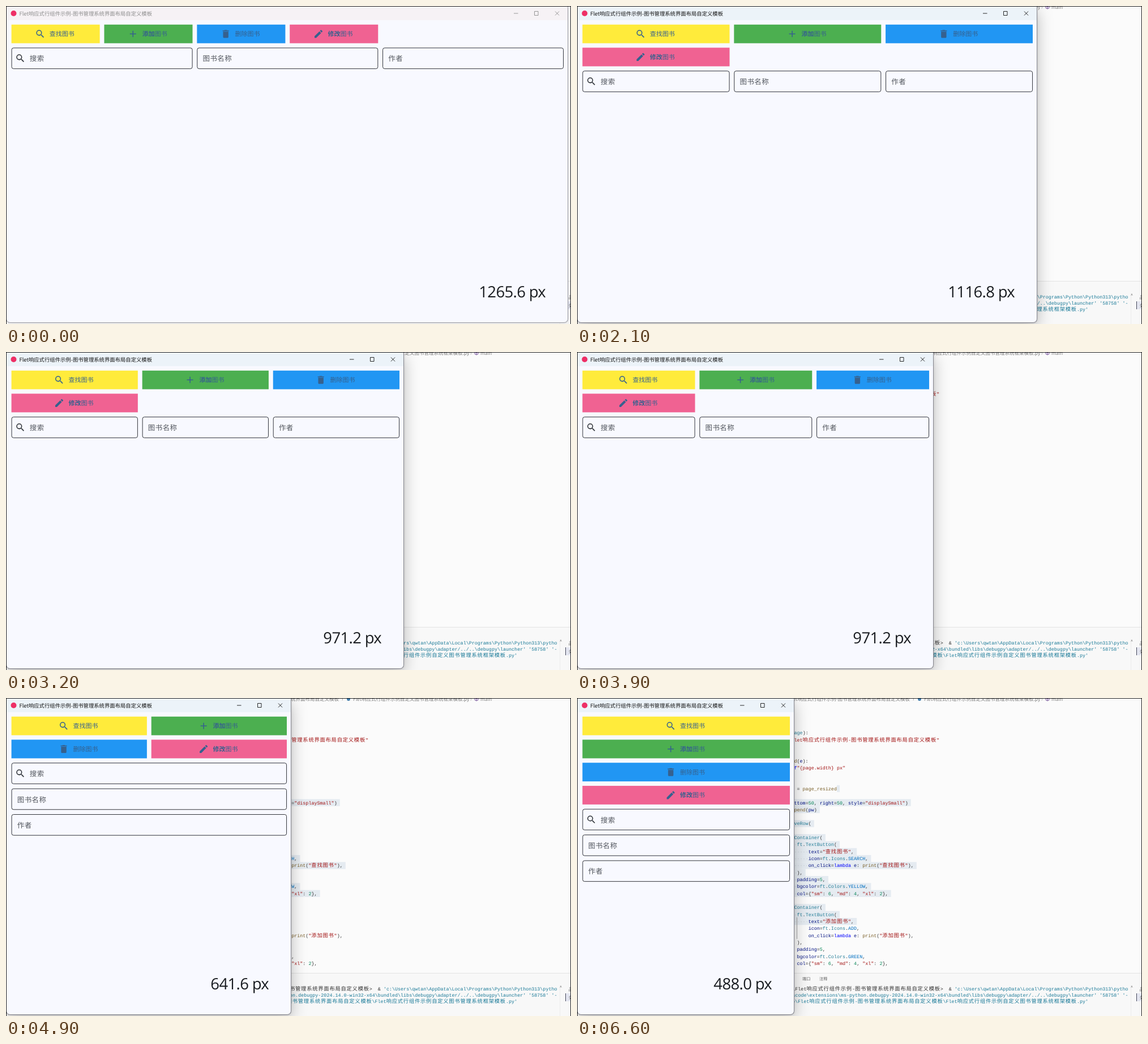
An HTML page for the animation above (8 s loop, 998 by 561 pixels).

```html
<!DOCTYPE html>
<html lang="zh">
<head>
<meta charset="utf-8">
<style>
html, body { margin: 0; width: 100%; height: 100%; overflow: hidden; }
#stage { position: relative; width: 998px; height: 561px; overflow: hidden; background: #fbfbfb; }
#stage > * { position: absolute; left: 0; top: 0; }
text { font-family: "Noto Sans CJK SC", "Noto Sans CJK", sans-serif; white-space: pre; text-rendering: geometricPrecision; }
.tab { font-size: 7.2px; fill: #5c5c5c; }
.crumb { font-size: 8.5px; fill: #777; }
.mono { font: 8.38px "Liberation Mono", monospace; fill: #333; }
.mono .han { font: 9.3px "Noto Sans CJK SC", "Noto Sans CJK", sans-serif; letter-spacing: .76px; }
.term { fill: #1a7a98; }
#stage .win { top: 1px; height: 558px; box-sizing: border-box; background: #f8f9ff; border: 1px solid #9a9aa2; border-top: 0; border-radius: 0 0 7px 7px; overflow: hidden; box-shadow: 0 2px 8px rgba(0,0,0,.1); }
.bar { height: 24px; background: #f6f2f5; }
.title { font-size: 9.36px; fill: #8d8d8d; }
.caps { fill: none; stroke: #8d8d8d; stroke-width: .9; }
#stage.active .win { border-color: #85858d; box-shadow: 0 8px 28px rgba(0,0,0,.26), 0 0 4px rgba(0,0,0,.12); }
.active .bar { background: #ecf3f9; }
.active .title { fill: #111; }
.active .caps { stroke: #111; }
.btn { fill: #36618e; font-size: 11px; }
.btn .bold { font-weight: 600; }
.field { fill: #53575e; font-size: 12.5px; letter-spacing: .39px; }
.field rect { fill: none; stroke: #1d2025; stroke-width: .9; }
.field path { fill: #30343a; }
.size { font: 27.5px "Open Sans", "Noto Sans", sans-serif; letter-spacing: -.68px; fill: #191c20; text-anchor: end; }
</style>
</head>
<body>
<div id="stage">
  <svg id="editor" width="998" height="561"></svg>
  <div class="win"><div class="bar"></div></div>
  <svg id="app" width="998" height="561"></svg>
</div>
<script>
const $ = q => document.querySelector(q);
const stage = $('#stage'), win = $('.win');

const text = (x, y, body, cls, anchor = 'start') =>
  `<text x="${x}" y="${y}" class="${cls}" text-anchor="${anchor}">${body}</text>`;
const rect = (x, y, w, h, fill) =>
  `<rect x="${x}" y="${y}" width="${w}" height="${h}" fill="${fill}"/>`;

// ---------- editor behind the window ----------
const CELL = 5.03;
const HAN = /[\u4e00-\u9fff]+/g;
const cells = s => s.length + (s.match(HAN) || []).join('').length;
const esc = s => s.replace(/&/g, '&amp;').replace(/</g, '&lt;').replace(/>/g, '&gt;')
  .replace(HAN, '<tspan class="han">$&</tspan>');

const inks = ['#a31515', '#00f', '#098658', '#267f99', '#0070c1', '#795e26', '#001080', '#c4ccd4'];
const token = /("[^"]*")|\b(def|lambda|f(?="))\b|\b(\d+)\b|\b(ft|[A-Z][a-z]\w+)\b|\b([A-Z]{2,})\b|(\w+(?=\()|page_resized)|(\w+)|(·+)/g;

function paint(line) {
  let out = '', last = 0;
  for (const m of line.matchAll(token)) {
    const kind = m.slice(1).findIndex(Boolean);
    out += esc(line.slice(last, m.index)) + `<tspan fill="${inks[kind]}">${esc(m[0])}</tspan>`;
    last = m.index + m[0].length;
  }
  return out + esc(line.slice(last));
}

const folder = 'Flet响应式行组件示例-图书管理系统界面布局自定义模板';
const file = 'Flet响应式行组件示例自定义图书管理系统框架模板.py';
const user = 'qwtan';

const button = (label, icon, color) => `                ft.Container(
                    ft.TextButton(
                        text="${label}",
                        icon=ft.Icons.${icon},
                        on_click=lambda e: print("${label}"),
                    ),
                    padding=5,
                    bgcolor=ft.Colors.${color},
                    col={"sm": 6, "md": 4, "xl": 2},`;

const code = `def main(page: ft.Page):
    page.title = "${folder}"


    def page_resized(e):
        pw.value = f"{page.width} px"
        pw.update()

    page.on_resized = page_resized

    pw = ft.Text(bottom=50, right=50, style="displaySmall")
    page.overlay.append(pw)
    page.add(
        ft.ResponsiveRow(
            [
${button('查找图书', 'SEARCH', 'YELLOW')}
                ),
${button('添加图书', 'ADD', 'GREEN')}`;

const CODE_X = 288, LINE = 12.33;

function codeLine(line, i) {
  const mid = 61.3 + i * LINE, top = mid - LINE / 2;
  const picked = i > 8 && i < 28;
  const end = CODE_X + cells(line) * CELL;
  let back = '';
  if (picked) back = rect(CODE_X, top, end + CELL - CODE_X, LINE, '#e5ebf1');
  if (i === 8) back = rect(end, top, CELL, LINE, '#e5ebf1');
  const body = picked ? line.replace(/^ +/, s => '·'.repeat(s.length)) : line;
  return back + text(CODE_X, mid + 2.9, paint(body), 'mono');
}

const term = (x, y, body) => text(x, y, body, 'mono term', 'end');

$('#editor').innerHTML = [
  ...code.split('\n').map(codeLine),
  rect(388, 387, 1, 38, '#a5a5a5'),

  text(588, 4.7, folder, 'crumb', 'end'),
  text(593, 4.7, '›', 'crumb'),
  '<circle cx="605" cy="2" r="3" fill="#3f7cac"/>',
  text(613, 4.7, file, 'crumb'),
  text(820, 4.7, '›', 'crumb'),
  '<path transform="translate(827 -2)" fill="none" stroke="#75529a" d="M1 2 4 .5 7 2V5.5L4 7 1 5.5ZM1 2 4 3.5 7 2M4 3.5V7"/>',
  text(838, 4.7, 'main', 'crumb'),

  rect(0, 485, 998, 76, '#f8f8f8'),
  rect(0, 485, 998, 1, '#e3e3e3'),
  text(398, 498.2, '端口', 'tab'),
  text(428, 498.2, '注释', 'tab'),
  term(973.5, 515.9, `<tspan fill="#333">${esc('\\' + folder + '>  & ')}</tspan>` +
    esc(`'c:\\Users\\${user}\\AppData\\Local\\Programs\\Python\\Python313\\pytho`)),
  term(973.5, 527.2, ".vscode\\extensions\\ms-python.debugpy-2024.14.0-win32-x64\\bundled\\libs\\debugpy\\adapter/../..\\debugpy\\launcher' '58758' '-"),
  term(903, 538.4, esc(`demo\\${folder}\\${file}'`)),
  rect(978, 507, 1, 54, '#ececec'),
  text(978, 513, '^', 'tab'),
  rect(988, 521, 10, 14, '#e4e6f1'),
  rect(988, 521, 1, 14, '#44475a'),
  text(993.5, 516.5, '品', 'crumb'),
  text(994, 531.5, '效', 'crumb')
].join('');

// ---------- app window ----------
const icons = {
  search: 'M15.5 14h-.79l-.28-.27A6.47 6.47 0 0 0 16 9.5 6.5 6.5 0 1 0 9.5 16c1.61 0 3.09-.59 4.23-1.57l.27.28v.79l5 4.99L20.49 19zm-6 0a4.5 4.5 0 1 1 0-9 4.5 4.5 0 0 1 0 9z',
  plus: 'M19 13h-6v6h-2v-6H5v-2h6V5h2v6h6z',
  trash: 'M6 19c0 1.1.9 2 2 2h8c1.1 0 2-.9 2-2V7H6zM19 4h-3.5l-1-1h-5l-1 1H5v2h14z',
  pen: 'M3 17.25V21h3.75L17.81 9.94l-3.75-3.75zM20.71 7.04a1 1 0 0 0 0-1.41l-2.34-2.34a1 1 0 0 0-1.41 0l-1.83 1.83 3.75 3.75z'
};
// Layout constants in stage pixels; S is one logical pixel.
const S = .783, LEFT = 9.6, TOP = 32.8, GAP = 10 * S, BTN_H = 42 * S, FIELD_H = 48 * S;

const icon = (name, x, h) =>
  `<path transform="translate(${x} ${h / 2 - 12 * S}) scale(${S})" d="${icons[name]}"/>`;
const bold = s => `<tspan class="bold">${s}</tspan>`;

const btn = (fill, name, label) => `<g class="btn">${rect(0, 0, 0, BTN_H, fill)}
  <g class="mid">${icon(name, -36.6, BTN_H)}${text(-10.8, 20.4, label, '')}</g></g>`;
const field = (label, x = 10.2, extra = '') =>
  `<g class="field"><rect x=".45" y=".45" height="${FIELD_H - .9}" rx="3.3"/>${extra}${text(x, 23.9, label, '')}</g>`;

$('#app').innerHTML = [
  '<circle cx="13.5" cy="13" r="5" fill="#ee2f66"/>',
  text(23.5, 16.7, folder, 'title'),
  '<path class="caps" d="M.5 4H8M37 .5h6.500v7H37ZM73.500.5l7 7m0-7-7 7"/>',
  btn('#ffeb3b', 'search', '查找图书'),
  btn('#4caf50', 'plus', bold('添加') + '图书'),
  btn('#2196f3', 'trash', '删除图书'),
  btn('#f06292', 'pen', bold('修改') + '图书'),
  field('搜索', 32.2, icon('search', 6.3, FIELD_H)),
  field('图书名称'),
  field('作者'),
  text(0, 513.8, '', 'size'),
  rect(0, 0, 998, 1, '#222'),
  rect(0, 0, 1, 561, '#222'),
  rect(997, 0, 1, 561, '#222')
].join('');

const caps = $('.caps'), size = $('.size');
const buttons = [...document.querySelectorAll('.btn')];
const fields = [...document.querySelectorAll('.field')];

// ---------- timeline ----------
const LOOP = 8000;
const widths = [
  [0, 993], [1300, 895], [1400, 876], [1800, 861], [2100, 813], [2200, 797], [2300, 781],
  [2400, 767], [2600, 764], [2700, 762], [3100, 733], [3200, 703], [3300, 688], [3400, 673],
  [3600, 659], [3700, 645], [3900, 630], [4000, 616], [4200, 600], [4300, 586], [4400, 572],
  [4600, 538], [4700, 504], [5900, 428], [6000, 427], [6200, 412], [6300, 397], [6400, 384]
];
// The page learns its new width only after a drag pauses.
const reported = [
  [0, 1265.6], [1600, 1116.8], [2600, 977.6], [2700, 973.6], [2900, 971.2],
  [4900, 641.6], [6300, 521.6], [6600, 488]
];
const at = (steps, t) => steps.findLast(s => s[0] <= t)[1];
const move = (el, x, y) => el.setAttribute('transform', `translate(${x} ${y})`);

// Lays items out on the 12-column grid; returns the y below them.
function flow(items, span, right, top, height) {
  const perRow = 12 / span;
  const pitch = (right - LEFT + GAP) / perRow, width = pitch - GAP;
  items.forEach((el, i) => {
    move(el, LEFT + (i % perRow) * pitch, top + Math.floor(i / perRow) * (height + GAP));
    const box = el.querySelector('rect'), mid = el.querySelector('.mid');
    box.setAttribute('width', width - 2 * box.x.baseVal.value);
    if (mid) move(mid, width / 2, 0);
  });
  return top + Math.ceil(items.length / perRow) * (height + GAP);
}

let shown = '';
function draw(t) {
  const w = at(widths, t), px = at(reported, t), active = t >= 500;
  const key = [w, px, active].join();
  if (key === shown) return;
  shown = key;
  stage.classList.toggle('active', active);
  win.style.width = w + 'px';
  move(caps, w - 96.5, 9);
  const span = px >= 1200 ? 2 : px >= 768 ? 4 : px >= 576 ? 6 : 12;
  const y = flow(buttons, span, w - 8, TOP, BTN_H);
  flow(fields, px >= 768 ? 4 : 12, w - 8, y, FIELD_H);
  size.textContent = px.toFixed(1) + ' px';
  size.setAttribute('x', w - 40);
}

function tick() {
  draw(performance.now() % LOOP);
  requestAnimationFrame(tick);
}
tick();
</script>
</body>
</html>
```
